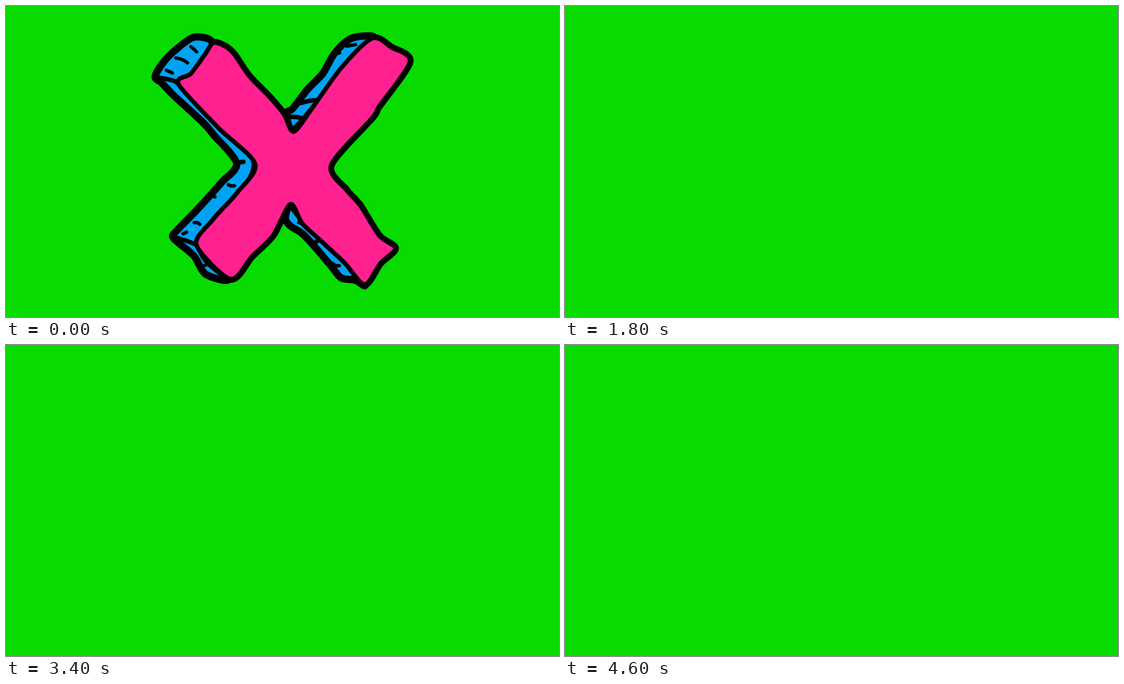
Recreate the animation shown at these times as an HTML page. Size 990 by 557 pixels, loop 4800 ms.

```html
<!DOCTYPE html>
<html lang="en">
<head>
<meta charset="utf-8">
<title>Flashing letter</title>
<style>
html, body { margin: 0; width: 100%; height: 100%; overflow: hidden; background: #07db00; }
svg { display: block; width: 100%; height: 100%; }
path { stroke: #000; stroke-linecap: round; stroke-linejoin: round; }
</style>
</head>
<body>
<svg viewBox="0 0 990 557"><g id="letter"></g></svg>
<script>
const PINK = '#ff2190', BLUE = '#00a2f3';
const OUTLINE = 13, EDGE = 8, HATCH = 6, TENSION = 0.14, BLINK = 400;
const letter = document.getElementById('letter');

function add(d, fill, width) {
  const path = document.createElementNS('http://www.w3.org/2000/svg', 'path');
  path.setAttribute('d', d);
  path.setAttribute('fill', fill);
  path.setAttribute('stroke-width', width);
  letter.append(path);
}

// Smooth closed curve through a few key points
function loop(text) {
  const pts = text.split(' ').map(p => p.split(',').map(Number));
  const at = i => pts[(i + pts.length) % pts.length];
  const handle = (p, from, to) => p.map((v, k) => v + (to[k] - from[k]) * TENSION);
  return 'M' + pts[0] + pts.map((p, i) => {
    const q = at(i + 1);
    return `C${handle(p, at(i - 1), q)} ${handle(q, at(i + 2), p)} ${q}`;
  }).join('') + 'Z';
}

const face = loop('309,140 331,121 356,87 371,66 392,72 409,87 435,125 470,161 497,193 515,225 ' +
  '548,183 600,111 655,58 690,74 723,100 668,180 656,200 582,285 610,330 634,357 668,411 ' +
  '697,434 670,461 642,499 606,460 562,419 530,389 509,355 478,411 440,449 402,489 341,428 ' +
  '370,383 414,334 446,283 380,218');

const sides = [
  '267,127 280,103 303,79 336,56 368,63 368,100 330,150 446,283 350,428 398,489 357,480 ' +
    '336,447 300,416 305,403 340,367 385,317 413,282 372,231 352,208 300,160 279,138',
  '502,192 513,184 540,149 567,121 588,85 618,58 658,55 640,80 570,160 515,222',
  '500,380 509,394 531,408 556,435 583,467 600,487 625,491 642,499 600,440 530,380 509,356'
];

const creases = ['M268 128Q290 130 303 135L311 142', 'M302 414Q325 420 341 428',
  'M528 174Q545 168 560 169', 'M503 199Q520 197 533 202', 'M548 427L560 419',
  'M414 281L425 279', 'M655 55L659 54'];

const hatching = ['M331 73Q337 77 341 82', 'M304 93Q318 95 325 102', 'M287 115L298 120',
  'M610 72L626 69', 'M588 86L597 84', 'M398 320Q402 323 409 322', 'M370 340L374 342',
  'M337 388Q343 387 347 391', 'M317 408L323 405', 'M355 465L360 463',
  'M585 461Q590 466 597 465', 'M524 388L527 389'];

// The heavy outline lies under the sides, the face on top of both
add(face, PINK, OUTLINE);
sides.forEach(s => add(loop(s), BLUE, OUTLINE));
creases.forEach(d => add(d, 'none', EDGE));
hatching.forEach(d => add(d, 'none', HATCH));
add(face, PINK, EDGE);

const start = performance.now();
function tick() {
  const t = performance.now() - start;
  letter.style.display = t % BLINK < BLINK / 2 ? '' : 'none';
  requestAnimationFrame(tick);
}
tick();
</script>
</body>
</html>
```
